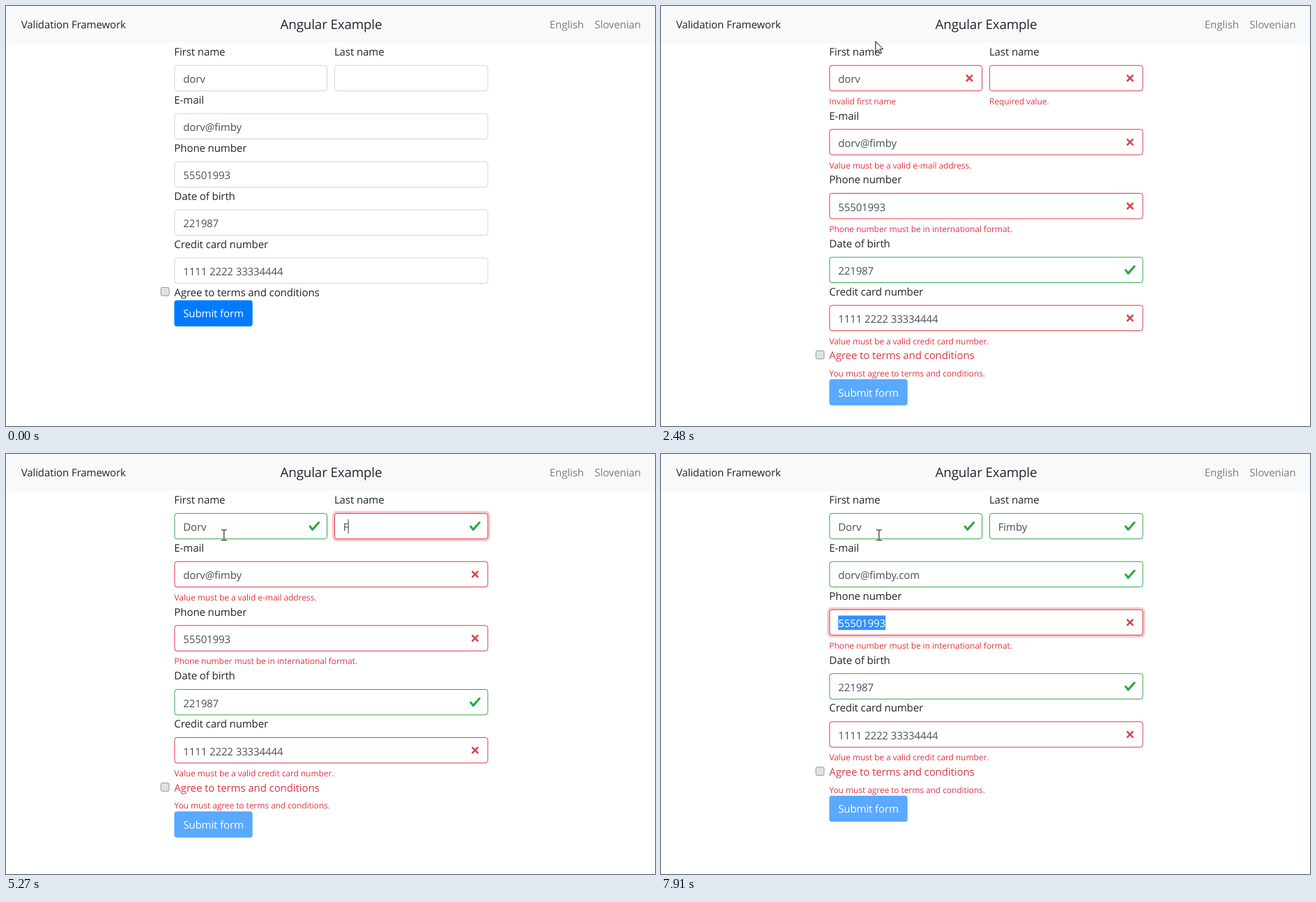
These frames come from a looping animation (931 by 602 pixels, 8000 ms). An HTML page:

```html
<!DOCTYPE html>
<html lang="en">
<head>
<meta charset="utf-8">
<title>Form validation</title>
<style>
html, body { margin: 0; height: 100%; overflow: hidden; background: #fff; }
svg { display: block; width: 931px; height: 602px; }
text { font: 15.225px "Open Sans", "Noto Sans", sans-serif; letter-spacing: -.006em; text-rendering: geometricPrecision; fill: #212529; }
.title { font-size: 19px; }
.muted { fill: rgba(0, 0, 0, .5); }
.value { fill: #495057; }
.error { font-size: 12.18px; fill: #dc3545; }
.red { fill: #dc3545; }
.white { fill: #fff; }
.ibeam { mix-blend-mode: difference; fill: none; stroke: #fff; }
</style>
</head>
<body>
<!-- The page is laid out at 945 x 611 and shown slightly reduced -->
<svg id="stage" viewBox="0 0 945 611" preserveAspectRatio="none"></svg>
<script>
const LOOP = 8000, SUBMIT = 1930;
const LEFT = 245, ROW_STEP = 70, BOX_HEIGHT = 38, ERROR_HEIGHT = 23;
const GREY = [206, 212, 218], RED = [220, 53, 69], GREEN = [40, 167, 69];
const BLUE = [0, 123, 255], HOVER = [0, 105, 217], PRESSED = [0, 98, 204];

const stage = document.getElementById('stage');
const ruler = document.createElement('canvas').getContext('2d');

const smooth = p => (p = Math.min(1, Math.max(0, p)), p * p * (3 - 2 * p));
const fade = (t, start) => smooth((t - start) / 140);
const mix = (a, b, p) => a.map((v, i) => v + (b[i] - v) * p);
const rgb = c => `rgb(${c.map(Math.round)})`;
const within = (t, a, b) => t >= a && t < b;
const typed = (t, word, times) => word.slice(0, times.filter(s => s <= t).length);

const fields = [
  { row: 0, w: 223, label: 'First name', error: 'Invalid first name', good: 4410, focus: [3090, 4800],
    value: t => t < 3400 ? 'dorv' : t < 4410 ? 'orv' : 'Dorv',
    caret: t => within(t, 4410, 4800) ? 'D' : within(t, 3090, 3710) || within(t, 4260, 4410) ? '' : null },
  { row: 0, x: 478, w: 224, label: 'Last name', error: 'Required value.', good: 5270, focus: [4800, 6050],
    value: t => typed(t, 'Fimby', [5270, 5380, 5500, 5730, 5880]),
    caret(t) { return within(t, 4800, 6050) ? this.value(t) : null; } },
  { row: 1, label: 'E-mail', error: 'Value must be a valid e-mail address.', good: 7360, focus: [6050, 7760],
    value: t => 'dorv@fimby' + typed(t, '.com', [7210, 7360, 7440, 7530]),
    caret(t) { return within(t, 6660, 7760) ? this.value(t) : null; },
    selected: [6050, 6660] },
  { row: 2, label: 'Phone number', error: 'Phone number must be in international format.', focus: [7760, Infinity],
    value: () => '55501993', selected: [7760, LOOP] },
  { row: 3, label: 'Date of birth', good: SUBMIT, value: () => '221987' },
  { row: 4, label: 'Credit card number', error: 'Value must be a valid credit card number.',
    value: () => '1111 2222 33334444' }
].map(f => ({ x: LEFT, w: 457, good: Infinity, focus: [Infinity, Infinity], selected: [0, 0], caret: () => null, ...f }));

// Cursor stops: time, x, y
const path = [[440, 784, 599], [900, 322.5, 447], [2330, 322.5, 447], [2480, 312, 51],
  [2560, 311, 47], [2710, 311, 47], [3010, 317.5, 118], [LOOP, 317.5, 118]];

const text = (x, y, s, cls = '') => `<text x="${x}" y="${y}" class="${cls}">${s}</text>`;
const rect = (x, y, w, h, fill, more = '') =>
  `<rect x="${x}" y="${y}" width="${w}" height="${h}" fill="${fill}" ${more}/>`;

function ring(x, y, w, color, alpha, p) {
  const d = 3.2 * p;
  return p > 0
    ? rect(x - d, y - d, w + 2 * d, BOX_HEIGHT + 2 * d, rgb(color), `rx="${4 + d}" opacity="${alpha * p}"`)
    : '';
}

function textWidth(s) {
  ruler.font = '15.225px "Open Sans", "Noto Sans", sans-serif';
  return ruler.measureText(s).width - s.length * .091;
}

function icon(x, y, ok) {
  return ok
    ? `<path transform="translate(${x - 9} ${y - 9}) scale(2.25)" fill="#28a745"
        d="M2.3 6.73L.6 4.53c-.4-1.04.46-1.4 1.1-.8l1.1 1.4 3.4-3.8c.6-.63 1.6-.27 1.2.7l-4 4.6c-.43.5-.8.4-1.1.1z"/>`
    : `<path transform="translate(${x} ${y}) scale(2.57)" stroke="#d9434a" stroke-linecap="round" d="M-1.5-1.5l3 3m0-3l-3 3"/>`;
}

const hasError = (f, t) => f.error && within(t, SUBMIT, f.good);

function drawField(f, y, t) {
  const { x, w } = f, value = f.value(t), tx = x + 13;
  const state = f.error ? mix(RED, GREEN, fade(t, f.good)) : GREEN;
  const border = mix(GREY, state, fade(t, SUBMIT));
  const selected = within(t, ...f.selected), caret = f.caret(t);
  let out = text(x, y - 14, f.label)
    + ring(x, y, w, state, .25, fade(t, f.focus[0]) - fade(t, f.focus[1]))
    + rect(x + .5, y + .5, w - 1, BOX_HEIGHT - 1, '#fff', `rx="3.5" stroke="${rgb(border)}"`);
  if (selected) out += rect(tx, y + 9, textWidth(value), 21, '#3390ff');
  out += text(tx, y + 26, value, selected ? 'white' : 'value');
  if (caret !== null) out += rect(Math.floor(tx + textWidth(caret)), y + 9, 1, 21, '#333');
  if (t >= SUBMIT) out += icon(x + w - 19, y + 19, t >= f.good);
  if (hasError(f, t)) out += text(x, y + 57, f.error, 'error');
  return out;
}

function drawButton(y, t) {
  const off = t >= SUBMIT;
  const fill = off ? BLUE : mix(mix(BLUE, HOVER, fade(t, 770)), PRESSED, fade(t, 1690));
  return ring(LEFT, y, 114, BLUE, .5, fade(t, 1780) - fade(t, SUBMIT))
    + rect(LEFT, y, 114, BOX_HEIGHT, rgb(fill), `rx="4" opacity="${off ? .65 : 1}"`)
    + text(LEFT + 13, y + 25, 'Submit form', 'white');
}

function drawCursor(t) {
  const i = path.findIndex(k => k[0] > t);
  if (i < 1) return '';
  const a = path[i - 1], b = path[i];
  const [, x, y] = mix(a, b, smooth((t - a[0]) / (b[0] - a[0])));
  const at = `transform="translate(${x} ${y})"`;
  if (t < 1840 && x < 359)
    return `<path ${at} fill="#fff" stroke="#000" d="M-2 1.5q0-2 1.7-2t1.7 2v6q3-1 4 .5q2-.5 3 1q2-.2 2 2v4q0 2-1 4v2h-9v-1.5l-5-7q-1-2 .6-2.4q1-.2 2 1.4z"/>`;
  if (t > 1840 && y > 86)
    return `<path ${at} class="ibeam" d="M-4-7.5h3q1 0 1 1v13q0 1-1 1h-3M4-7.5h-3q-1 0-1 1m0 13q0 1 1 1h3"/>`;
  return `<path ${at} fill="#fff" stroke="#000" d="M.5.5v15.5l3.6-3.3l2.5 5.6l2.4-1l-2.5-5.5h4.8z"/>`;
}

function draw(t) {
  const failed = t >= SUBMIT;
  let out = rect(0, 0, 945, 611, '#fff') + rect(0, 0, 945, 54, '#f8f9fa')
    + text(22, 32.5, 'Validation Framework') + text(399.5, 34, 'Angular Example', 'title')
    + text(791.5, 32.5, 'English', 'muted') + text(857, 32.5, 'Slovenian', 'muted');
  let y = 86;
  for (let row = 0; row < 5; row++) {
    const group = fields.filter(f => f.row === row);
    out += group.map(f => drawField(f, y, t)).join('');
    y += ROW_STEP + (group.some(f => hasError(f, t)) ? ERROR_HEIGHT : 0);
  }
  out += rect(225.5, y - 26.5, 12, 12, '#e2e2e4', 'rx="2" stroke="#95969c"')
    + text(LEFT, y - 14, 'Agree to terms and conditions', failed ? 'red' : '');
  if (failed) {
    out += text(LEFT, y + 11, 'You must agree to terms and conditions.', 'error');
    y += ERROR_HEIGHT;
  }
  stage.innerHTML = out + drawButton(y - 8, t) + drawCursor(t);
}

const begin = performance.now();
function tick() {
  draw((performance.now() - begin) % LOOP);
  requestAnimationFrame(tick);
}
tick();
</script>
</body>
</html>
```
